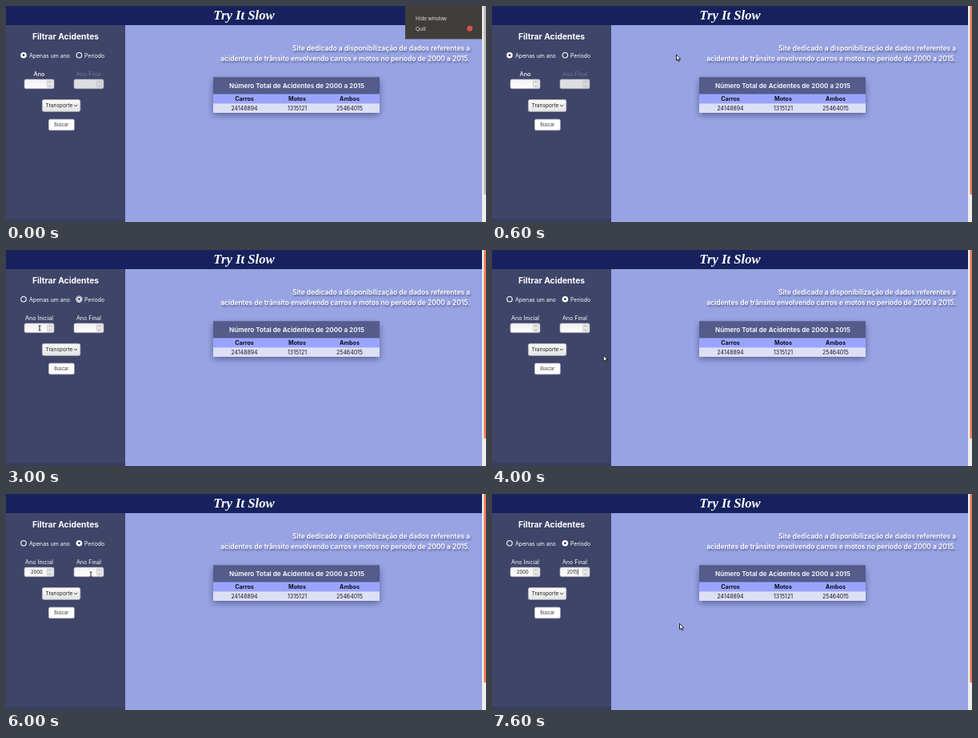
These frames come from a looping animation (600x271 px, 8 s). An HTML page with a canvas:

```html
<!DOCTYPE html>
<html lang="pt">
<head>
<meta charset="utf-8">
<title>Try It Slow</title>
<style>
html, body { margin: 0; width: 100%; height: 100%; overflow: hidden; background: #98a3e3; }
canvas { display: block; width: 600px; height: 271px; }
</style>
</head>
<body>
<canvas id="stage"></canvas>
<script>
const LOOP = 8000, STEP = 100;
const canvas = document.getElementById('stage');
const ctx = canvas.getContext('2d');
const ratio = window.devicePixelRatio || 1;
canvas.width = Math.round(600 * ratio);
canvas.height = Math.round(271 * ratio);

const SANS = 'Inter, "Open Sans", sans-serif';
const SIDE = '#3f4469';

// Pointer waypoints: time, x, y
const path = [
  [100, 545, 30], [600, 230.5, 61], [900, 92, 70], [1300, 66, 74],
  [1700, 96.5, 62], [1800, 96.5, 62], [2000, 101, 61], [2100, 92, 61.5],
  [2400, 92, 61.5], [3000, 42, 98], [3600, 42, 98], [4400, 236.5, 166.5],
  [5400, 236.5, 166.5], [6000, 106, 101], [6200, 106, 101],
  [7000, 234.5, 162.5], [LOOP, 234.5, 162.5]
];

const fields = [
  { x: 23, value: '2000', keys: [4600, 4700, 4900, 5000], focus: 3400, blur: 6000 },
  { x: 85, value: '2015', keys: [7100, 7200, 7400, 7600], focus: 6200, blur: LOOP }
];

function pointerAt(t) {
  const i = path.findIndex(p => p[0] > t);
  const a = path[i - 1], b = path[i];
  let k = (t - a[0]) / (b[0] - a[0]);
  k = k * k * (3 - 2 * k);
  return [a[1] + (b[1] - a[1]) * k, a[2] + (b[2] - a[2]) * k];
}

function rect(x, y, w, h, fill) {
  ctx.fillStyle = fill;
  ctx.fillRect(x, y, w, h);
}

function box(x, y, w, h, r, fill, stroke) {
  ctx.beginPath();
  ctx.roundRect(x, y, w, h, r);
  ctx.fillStyle = fill;
  ctx.fill();
  if (!stroke) return;
  ctx.lineWidth = 0.7;
  ctx.strokeStyle = stroke;
  ctx.stroke();
}

function disc(x, y, r, fill) {
  ctx.beginPath();
  ctx.arc(x, y, r, 0, Math.PI * 2);
  ctx.fillStyle = fill;
  ctx.fill();
}

function text(str, x, y, size, color, { weight = 400, align = 'left', family = SANS } = {}) {
  ctx.font = `${weight} ${size}px ${family}`;
  ctx.textAlign = align;
  ctx.fillStyle = color;
  ctx.fillText(str, x, y);
}

function line(points, color, width) {
  ctx.beginPath();
  points.forEach(([x, y]) => ctx.lineTo(x, y));
  ctx.strokeStyle = color;
  ctx.lineWidth = width;
  ctx.stroke();
}

function shadow(color, dx, dy, blur, draw) {
  ctx.save();
  ctx.shadowColor = color;
  ctx.shadowOffsetX = dx * ratio;
  ctx.shadowOffsetY = dy * ratio;
  ctx.shadowBlur = blur * ratio;
  draw();
  ctx.restore();
}

function verticalFade(y, h, top, bottom) {
  const g = ctx.createLinearGradient(0, y, 0, y + h);
  g.addColorStop(0, top);
  g.addColorStop(1, bottom);
  return g;
}

function radio(x, y, checked, focused) {
  disc(x, y, focused ? 4.2 : 3.8, '#fff');
  if (focused) disc(x, y, 3.4, '#5b6088');
  if (checked) {
    if (focused) disc(x, y, 2.8, '#fff');
    disc(x, y, 1.35, '#2d3150');
  } else {
    disc(x, y, 2.7, SIDE);
  }
}

function drawField(field, t, enabled) {
  const { x, value, keys, focus, blur } = field;
  const y = 92, cx = x + 15.3;
  box(x, y, 37, 11.7, 2, enabled ? verticalFade(y, 12, '#f0f0f2', '#ffffff') : '#dddde2', '#aaaab4');
  box(x + 28.5, y + 1.2, 6.5, 9.4, 1, enabled ? '#ececec' : '#d7d7dc', '#c4c4c8');
  const arrow = enabled ? '#6a6a6a' : '#a5a5ad';
  const ax = x + 31.7;
  line([[ax - 1.4, y + 4.3], [ax, y + 2.9], [ax + 1.4, y + 4.3]], arrow, 0.7);
  line([[ax - 1.4, y + 7.5], [ax, y + 8.9], [ax + 1.4, y + 7.5]], arrow, 0.7);

  const pressed = keys.filter(k => k <= t);
  const typed = value.slice(0, pressed.length);
  text(typed, cx, 100.1, 5.8, '#222', { align: 'center' });
  const lastAction = pressed.length ? pressed[pressed.length - 1] : focus;
  const blinkOn = Math.floor((t - lastAction) / 500) % 2 === 0;
  if (t >= focus && t < blur && blinkOn) {
    rect(cx + ctx.measureText(typed).width / 2 + 0.3, 94.2, 0.7, 7.4, '#222');
  }
}

function drawSidebar(t) {
  const period = t >= 2400;
  rect(0, 24, 149, 247, SIDE);
  rect(0, 267, 149, 4, '#383d60');
  text('Filtrar Acidentes', 74.5, 41.8, 10.3, '#fff', { weight: 700, align: 'center' });

  radio(22, 61.7, !period, false);
  radio(91.4, 61.7, period, period && t < 3400);
  text('Apenas um ano', 29, 65.2, 6.95, '#fff');
  text('Período', 98, 65.2, 6.9, '#fff');

  text(period ? 'Ano Inicial' : 'Ano', 41.5, 88, 7.2, '#fff', { weight: period ? 400 : 500, align: 'center' });
  text('Ano Final', 103.5, 88, 7.1, period ? '#fff' : '#737795', { align: 'center' });
  drawField(fields[0], t, true);
  drawField(fields[1], t, period);

  box(45.4, 117.6, 47.4, 14.8, 2, verticalFade(117, 15, '#fbfbfb', '#e4e4e5'), '#b8b8c0');
  text('Transporte', 49.5, 127.4, 6.6, '#222');
  line([[85, 123.9], [87, 125.9], [89, 123.9]], '#333', 1);
  box(53.6, 142.2, 31.6, 13.6, 1.5, '#fff', '#d5d5dd');
  text('Buscar', 69.2, 151, 5.5, '#333', { align: 'center' });
}

function drawContent() {
  rect(149, 24, 446, 247, '#98a3e3');
  shadow('rgba(40,45,90,.65)', 1, 1.4, 2.5, () => {
    const style = { weight: 600, align: 'right' };
    text('Site dedicado a disponibilização de dados referentes a', 580, 56.4, 8.45, '#fff', style);
    text('acidentes de trânsito envolvendo carros e motos no período de 2000 a 2015.', 580, 69.2, 8.45, '#fff', style);
  });

  shadow('rgba(30,35,80,.5)', 0, 3, 8, () => rect(259, 89.5, 208, 44.5, '#545c8c'));
  rect(259, 89.5, 208, 21, '#545c8c');
  rect(259, 110.5, 208, 11.7, '#9aa4ff');
  rect(259, 122.2, 208, 11.8, '#dddff7');
  text('Número Total de Acidentes de 2000 a 2015', 363.5, 102.7, 8.15, '#fff', { weight: 600, align: 'center' });
  const columns = [['Carros', '24148894', 298], ['Motos', '1315121', 364], ['Ambos', '25464015', 429.5]];
  for (const [name, total, x] of columns) {
    text(name, x, 119, 7.2, '#0c0d18', { weight: 700, align: 'center' });
    text(total, x, 130.8, 6.95, '#15161f', { align: 'center' });
  }
}

function drawMenu() {
  rect(499, 0, 96, 41.5, '#403e3a');
  const style = { family: '"Noto Sans", sans-serif' };
  text('Hide window', 512, 18.3, 6.4, '#e2e0db', style);
  text('Quit', 512, 30.8, 6.4, '#e2e0db', style);
  disc(579.7, 28.2, 3.5, '#d9554c');
}

function drawArrow(x, y) {
  ctx.save();
  ctx.translate(x, y);
  ctx.beginPath();
  [[0, 0], [0, 7.4], [1.7, 5.9], [2.9, 8.6], [4.1, 8.1], [2.9, 5.5], [5.2, 5.3]]
    .forEach(p => ctx.lineTo(...p));
  ctx.closePath();
  ctx.lineJoin = 'round';
  ctx.lineWidth = 0.9;
  ctx.fillStyle = '#fff';
  ctx.strokeStyle = '#111';
  ctx.fill();
  ctx.stroke();
  ctx.restore();
}

function drawBeam(x, y) {
  line([[x, y - 3], [x, y + 3]], '#222', 1);
  for (const dy of [-3, 3]) line([[x - 1.5, y + dy], [x + 1.5, y + dy]], '#222', 0.8);
}

function drawPointer(t) {
  const [x, y] = pointerAt(t);
  const overField = y > 92 && y < 104 && fields.some(f => x > f.x && x < f.x + 37);
  (overField ? drawBeam : drawArrow)(x, y);
}

function render(t) {
  ctx.setTransform(ratio, 0, 0, ratio, 0, 0);
  const menuOpen = t < 100;
  drawContent();
  drawSidebar(t);
  rect(0, 0, 595, 24, '#16215d');
  text('Try It Slow', 297.5, 17.2, 16.7, '#fff',
    { weight: 'italic 700', align: 'center', family: '"Liberation Serif", serif' });
  rect(595, 0, 5, 271, '#f0eeec');
  rect(597.4, 0, 2.6, 236.5, menuOpen ? '#b9b7b6' : '#ea7b5c');
  if (menuOpen) drawMenu();
  else drawPointer(t);
}

const start = performance.now();
function frame() {
  const elapsed = (performance.now() - start) % LOOP;
  render(Math.floor(elapsed / STEP) * STEP);
  requestAnimationFrame(frame);
}
frame();
</script>
</body>
</html>
```
